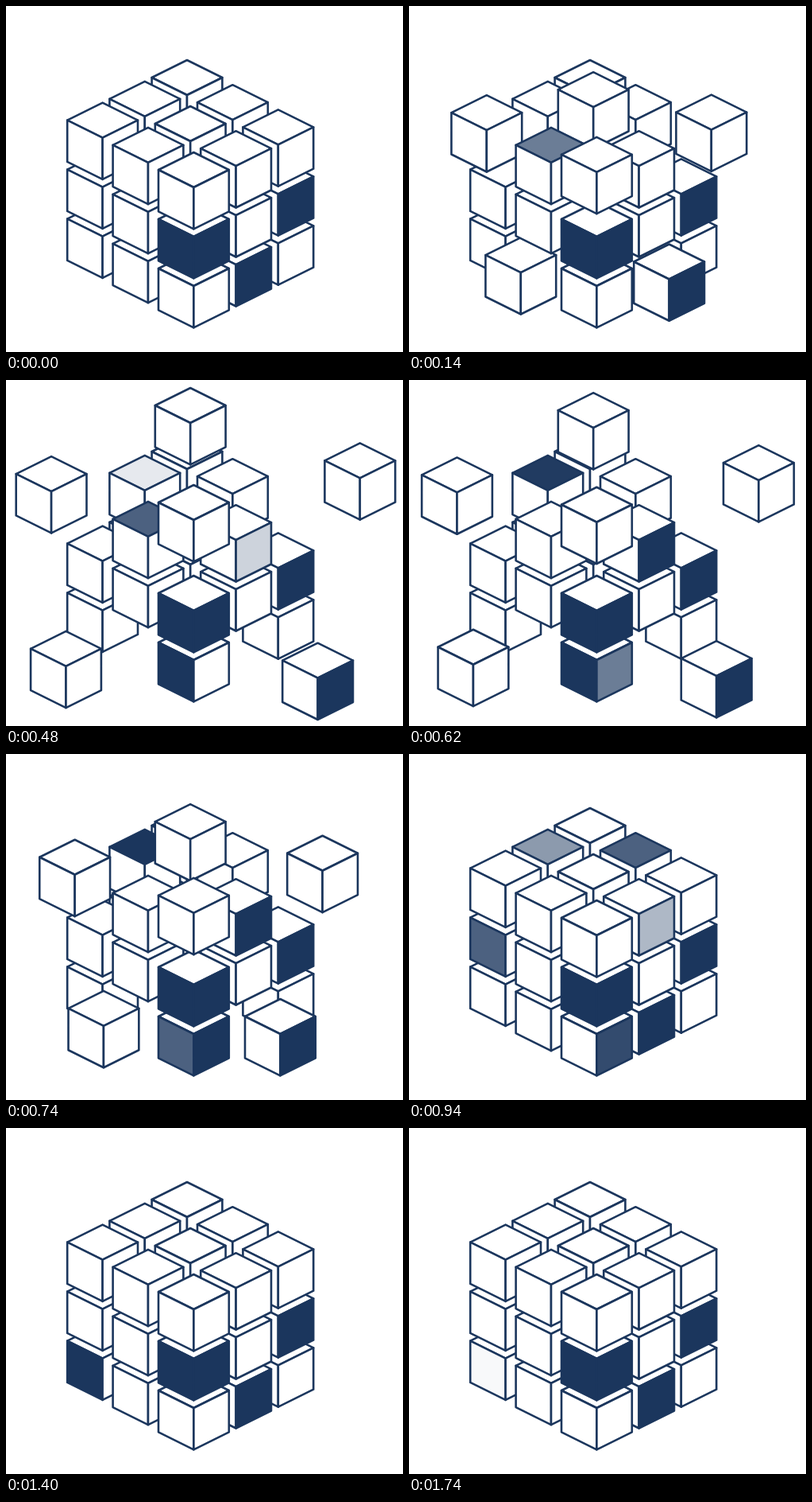
Animation of 500x435 px, one loop 1800 ms. Source, as an HTML page with a canvas:

```html
<!DOCTYPE html>
<html lang="en">
<head>
<meta charset="utf-8">
<title>Cube</title>
<style>
html, body { margin: 0; width: 100%; height: 100%; overflow: hidden; background: #fff; }
canvas { display: block; }
</style>
</head>
<body>
<canvas id="stage" width="500" height="435"></canvas>
<script>
const ctx = document.getElementById('stage').getContext('2d');
const LOOP = 1800, STEP = 20;
const INK = '#1b365d';
const HALF_W = 44.4, HALF_H = 22, HEIGHT = 52.3, LAYER = 62;

// Cubes are keyed by steps to the left, steps to the right, layers down.
const shifts = {
  '110': [0, -116],
  '200': [-64.5, -25.5],
  '020': [103, -51],
  '220': [0, -52],
  '212': [-103.5, 39],
  '122': [103, 49.5]
};

// Faces: T top, L left, R right.
const solid = new Set(['221L', '221R', '021R', '122R']);
const flashes = {
  '210T': 20, '222L': 280, '120R': 420, '100T': 440,
  '222R': 500, '010T': 800, '201L': 800, '202L': 1160
};

const clamp = v => Math.min(1, Math.max(0, v));
const ease = u => (u = clamp(u), u * u * (3 - 2 * u));

// Rises from 0 to 1 between a and b, falls back between c and d.
const pulse = (t, a, b, c, d) =>
  ease((t - a) / (b - a)) - ease((t - c) / (d - c));

function tint(face, t) {
  if (solid.has(face)) return 1;
  const s = flashes[face];
  return s === undefined ? 0 : pulse(t, s, s + 200, s + 400, s + 600);
}

function drawFace(points, dark) {
  ctx.beginPath();
  points.forEach(([x, y]) => ctx.lineTo(x, y));
  ctx.closePath();
  ctx.fillStyle = '#fff';
  ctx.fill();
  ctx.globalAlpha = dark;
  ctx.fillStyle = INK;
  ctx.fill();
  ctx.globalAlpha = 1;
  ctx.stroke();
}

function drawCube(x, y, key, t) {
  const mid = [x, y], back = [x, y - 2 * HALF_H];
  const left = [x - HALF_W, y - HALF_H], right = [x + HALF_W, y - HALF_H];
  const down = ([px, py]) => [px, py + HEIGHT];
  drawFace([back, right, mid, left], tint(key + 'T', t));
  drawFace([left, mid, down(mid), down(left)], tint(key + 'L', t));
  drawFace([mid, right, down(right), down(mid)], tint(key + 'R', t));
}

function draw(t) {
  const spread = pulse(t, 0, 340, 570, 930);
  ctx.fillStyle = '#fff';
  ctx.fillRect(0, 0, 500, 435);
  ctx.strokeStyle = INK;
  ctx.lineWidth = 2.6;
  ctx.lineJoin = 'round';
  for (let i = 0; i < 3; i++)
    for (let j = 0; j < 3; j++)
      for (let k = 2; k >= 0; k--) {
        if (k === 2 && i < 2 && j < 2) continue; // inner bottom cubes stay empty
        const key = `${i}${j}${k}`;
        const [dx, dy] = shifts[key] || [0, 0];
        drawCube(228 - 53.2 * i + 57.4 * j + dx * spread,
                 112 + 26.8 * i + 31.2 * j + LAYER * k + dy * spread, key, t);
      }
}

function tick() {
  const t = performance.now() % LOOP;
  draw(Math.floor(t / STEP) * STEP);
  requestAnimationFrame(tick);
}
tick();
</script>
</body>
</html>
```
